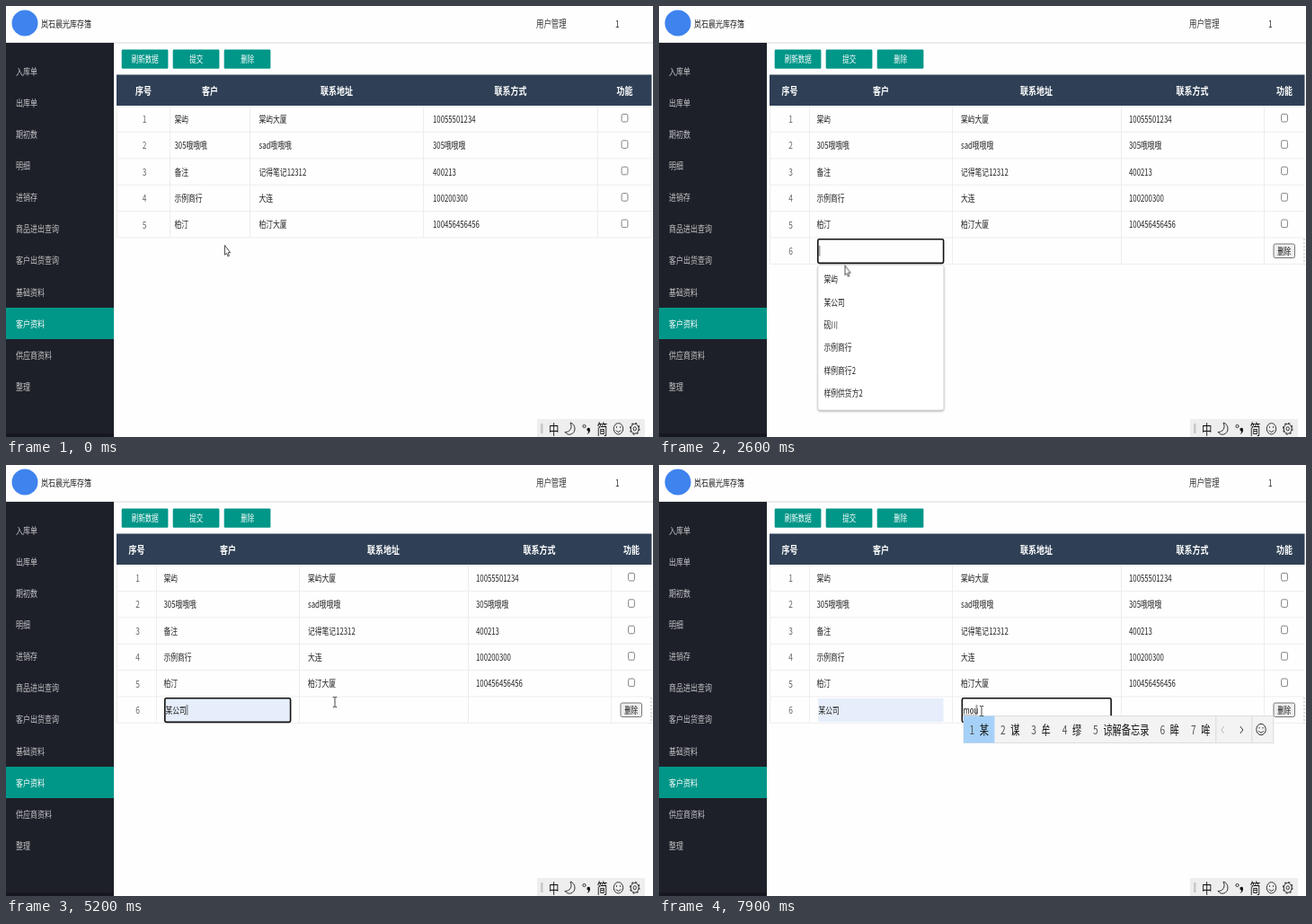
Animation of 720 by 480 pixels, one loop 8000 ms. Source, as an HTML page:

```html
<!DOCTYPE html>
<html lang="zh-CN">
<head>
<meta charset="utf-8">
<title>客户资料</title>
<style>
html, body { margin: 0; width: 100%; height: 100%; overflow: hidden; background: #fefefe; }
svg { display: block; width: 720px; height: 480px; }
text { font-family: "Noto Sans CJK SC", "Noto Sans CJK", "Noto Sans", sans-serif; white-space: pre; }
.span { animation: 8s step-end infinite; }
#pointer { animation: move 8s ease-in-out infinite; }
#caret { animation: caret 8s step-end infinite; }
@keyframes move {
  0%, 8.5% { transform: translate(243px, 266px); }
  12.5%, 21.25% { transform: translate(198px, 277px); }
  24%, 54% { transform: translate(206.5px, 288.5px); }
  56.25%, 60% { transform: translate(205px, 324px); }
  65%, 68.75% { transform: translate(366px, 264px); }
  71%, to { transform: translate(359px, 274px); }
}
@keyframes caret {
  0% { opacity: 0; transform: translateX(178.5px); }
  18.75% { opacity: 1; transform: translateX(178.5px); }
  25.3% { opacity: 0; transform: translateX(178.5px); }
  31.9% { opacity: 1; transform: translateX(178.5px); }
  38.5% { opacity: 0; transform: translateX(178.5px); }
  45.1% { opacity: 1; transform: translateX(178.5px); }
  51.75% { opacity: 0; transform: translateX(178.5px); }
  58.75% { opacity: 1; transform: translateX(201.5px); }
  65.4% { opacity: 0; transform: translateX(201.5px); }
  72% { opacity: 1; transform: translateX(201.5px); }
  74.25% { opacity: 1; transform: translateX(339.5px); }
  80.9% { opacity: 0; transform: translateX(339.5px); }
  87.5% { opacity: 1; transform: translateX(339.5px); }
  90% { opacity: 1; transform: translateX(345.5px); }
  92.5% { opacity: 1; transform: translateX(349.5px); }
  95%, to { opacity: 1; transform: translateX(353.5px); }
}
</style>
</head>
<body>
<script>
const LOOP = 8000;
const SX = .6, SY = .78; // the screen is squeezed into the stage
let css = '', spans = 0;

const rect = (x, y, w, h, fill, extra = '') =>
  `<rect x="${x}" y="${y}" width="${w}" height="${h}" fill="${fill}" ${extra}/>`;
const path = (d, extra = '') => `<path d="${d}" fill="none" stroke="#333" ${extra}/>`;
const oval = (x, y, rx, ry, extra = '') =>
  `<ellipse cx="${x}" cy="${y}" rx="${rx}" ry="${ry}" fill="none" stroke="#333" ${extra}/>`;

// Text placed by its vertical centre
const text = (x, cy, str, size = 13, fill = '#222', extra = '') =>
  `<text transform="translate(${x} ${cy + size * .38 * SY}) scale(${SX} ${SY})" font-size="${size}" fill="${fill}" ${extra}>${str}</text>`;
const mid = (x, cy, str, size, fill, extra = '') =>
  text(x, cy, str, size, fill, 'text-anchor="middle" ' + extra);

// Visible from a to b (ms)
function span(a, b, body) {
  const name = 's' + spans++;
  css += `@keyframes ${name}{0%{opacity:${+!a}}${a * 100 / LOOP}%{opacity:1}` +
    `${b * 100 / LOOP}%,to{opacity:${+(b === LOOP)}}}`;
  return `<g class="span" style="animation-name:${name}">${body}</g>`;
}

const smile = (x, y) => oval(x, y, 5.2, 6.2) +
  path(`M${x - 2.8} ${y + 1.6}q2.8 4 5.6 0M${x - 2} ${y - 2.6}v1.6M${x + 2} ${y - 2.6}v1.6`);

function frame() {
  const menu = ['入库单', '出库单', '期初数', '明细', '进销存', '商品进出查询',
    '客户出货查询', '基础资料', '客户资料', '供应商资料', '整理'];
  return rect(0, 40.5, 720, 1, '#dcdcdc') +
    '<circle cx="21" cy="19" r="14.5" fill="#3f83ee"/>' +
    text(39, 20, '岚石晨光库存簿', 13.33, '#222', 'font-weight="500"') +
    text(590, 19.5, '用户管理', 14, '#333') + text(678, 19.5, '1', 14, '#333') +
    rect(0, 41, 120, 439, '#1e2029') + rect(0, 476, 120, 4, '#17181f') +
    rect(0, 336, 120, 35, '#009688') +
    menu.map((m, i) => text(11, 73 + i * 35.08, m, 13.33, i === 8 ? '#fff' : '#c3c4c7',
      i === 8 ? 'font-weight="500"' : '')).join('') +
    ['刷新数据', '提交', '删除'].map((b, i) =>
      rect(128.7 + i * 57, 48.6, 51.7, 21.1, '#009688', 'rx="1.2"') +
      mid(154.7 + i * 57, 59.5, b, 12.5, '#fff', 'font-weight="500"')).join('') +
    rect(123, 76.5, 595.5, 34.5, '#2f4056');
}

const rows = [
  ['棠屿', '棠屿大厦', '10055501234'],
  ['305哦哦哦', 'sad哦哦哦', '305哦哦哦'],
  ['备注', '记得笔记12312', '400213'],
  ['示例商行', '大连', '100200300'],
  ['柏汀', '柏汀大厦', '100456456456']
];

function table(count, lines, textX, headX, numX, checkX) {
  const rowH = 29.4, top = 111;
  let s = ['序号', '客户', '联系地址', '联系方式', '功能'].map((h, i) =>
    mid(headX[i], 94.5, h, 15, '#fff', 'font-weight="700"')).join('');
  let grid = '';
  for (const x of lines) grid += `M${x} ${top}V${top + count * rowH}`;
  for (let i = 0; i < count; i++) {
    const cy = 126 + i * rowH;
    grid += `M123.5 ${top + (i + 1) * rowH}H718`;
    s += mid(numX, cy - .2, i + 1, 14, '#666');
    if (!rows[i]) continue;
    s += rows[i].map((c, k) => text(textX[k], cy, c)).join('');
    s += rect(checkX - 3.4, cy - 5.6, 6.8, 8.6, '#fff', 'rx="1.6" stroke="#767676" stroke-width=".9"');
  }
  return `<path d="${grid}" fill="none" stroke="#ededf0"/>` + s;
}

function lastRow() {
  return rect(684, 265, 23.5, 15.5, '#efefef', 'rx="1.8" stroke="#767676"') +
    mid(695.7, 273, '删除', 12.5, '#111') +
    path('M718 259V288', 'stroke-dasharray="2 2" style="stroke:#bbb"');
}

const focus = (x, w) => rect(x, 259.8, w, 26.6, 'none', 'rx="1.6" stroke="#111" stroke-width="1.6"');

function dropdown(x, w, items, bottom) {
  return rect(x, 288.5, w, bottom - 288.5, '#fff',
      'rx="2" stroke="#dedede" stroke-width=".8" style="filter:drop-shadow(0 1px 1px #0005)"') +
    items.map((s, i) => text(x + 6.5, 304.5 + i * 25.35, s)).join('');
}

function candidates(words) {
  const cell = 34.4, em = 10, tail = 64;
  let x = 339, s = '';
  words.forEach((w, i) => {
    const width = cell + (w.length - 1) * em;
    if (!i) s += rect(x, 279.5, width, 30, '#a5d1f8');
    s += text(x + 6.5, 295, i + 1, 17, '#555') + text(x + 17.8, 295, w, 17, '#111');
    x += width;
  });
  return rect(339, 279.5, x + tail - 339, 30, '#f3f3f3', 'stroke="#d6d6d6" stroke-width=".8"') + s +
    path(`M${x} 280v29M${x + 40} 280v29`, 'style="stroke:#dadada"') +
    path(`M${x + 9} 291l-3 4 3 4`, 'style="stroke:#b5b5b5"') +
    path(`M${x + 27} 291l3 4-3 4`) + smile(x + 50.2, 294.5);
}

const typed = str => text(338.5, 273, str, 13, '#111') +
  path(`M338.5 278.2h${[6, 10.5, 15][str.length - 1]}`, 'stroke-width=".7" stroke-dasharray="1 .7"');

function inputBar() {
  return rect(591, 460, 120, 20, '#eeeeee') + rect(595, 465, 2.5, 11, '#c8c8c8') +
    text(604, 471.5, '中', 19, '#111') +
    path('M628 464c3 6-1 11-6 10.5c4 5.5 11 2 11-3.5c0-4-2-6-5-7z') +
    oval(643.5, 468, 1.6, 1.6) +
    '<path d="M646.5 470.5q3.5-2 3.5 1.5q0 3.5-3.5 5q2-2 1.5-3.5q-2-.5-1.5-3z" fill="#111"/>' +
    text(657.5, 471.5, '简', 20, '#111') + smile(681.5, 470.8) +
    oval(699.7, 470.8, 4.4, 5.4) +
    oval(699.7, 470.8, 5.2, 6.3, 'stroke-width="1.1" stroke-dasharray="2.2 2.3"') +
    oval(699.7, 470.8, 1.7, 2.1);
}

const arrow = '<path d="M.5 .5V11.2L2.5 9.3 4 12.9 5.4 12.2 4 8.7H6.7Z" fill="#fff" stroke="#222" stroke-width=".8"/>';
const beam = path('M-2.2-5.5H-.6L0-5 .6-5.5H2.2M0-5V5M-2.2 5.5H-.6L0 5 .6 5.5H2.2', 'stroke-width=".9"');
const pick = '某公司';

const scene = frame() +
  span(0, 600, table(5, [123.5, 182.5, 271.5, 464.5, 658.5, 718],
    [187.5, 281.5, 475], [153, 227, 368, 561.5, 688.5], 154, 688.5)) +
  span(600, LOOP, table(6, [123.5, 167.5, 326.5, 514.5, 673.5],
    [175.5, 336, 523], [145.5, 247, 420, 593.5, 696], 146.5, 696) + lastRow()) +
  span(4500, LOOP, rect(177, 260, 139.5, 26, '#e5eefa') + text(177.5, 273, pick)) +
  span(1500, 5940, focus(176.8, 139.8)) +
  span(5940, LOOP, rect(337, 260, 166, 26, '#fff') + focus(337.3, 165.8)) +
  span(1700, 4700, dropdown(177, 139.8,
    ['棠屿', pick, '砚川', '示例商行', '样例商行2', '样例供货方2'], 450)) +
  span(4500, 4700, rect(177, 317.5, 139.8, 25.4, '#ebebeb') + text(183.5, 329.85, pick)) +
  span(6200, 7700, dropdown(337.5, 165.8,
    ['棠屿大厦', '大连', '天津', '砚川大厦', '柏汀大厦'], 424.7)) +
  span(7200, 7400, typed('m') + candidates([...'吗没买们么马名'])) +
  span(7400, 7600, typed('mo') + candidates([...'么莫摸末默魔抹'])) +
  span(7600, LOOP, typed('mou') + candidates(['某', '谋', '牟', '缪', '谅解备忘录', '眸', '哞'])) +
  `<g id="caret">${path('M0 267V278.5', 'stroke-width=".9"')}</g>` +
  inputBar() +
  `<g id="pointer">${span(0, 900, arrow)}${span(900, 1800, beam)}` +
  `${span(1800, 5000, arrow)}${span(5000, LOOP, beam)}</g>`;

document.head.insertAdjacentHTML('beforeend', `<style>${css}</style>`);
document.body.innerHTML = `<svg viewBox="0 0 720 480">${scene}</svg>`;
</script>
</body>
</html>
```
